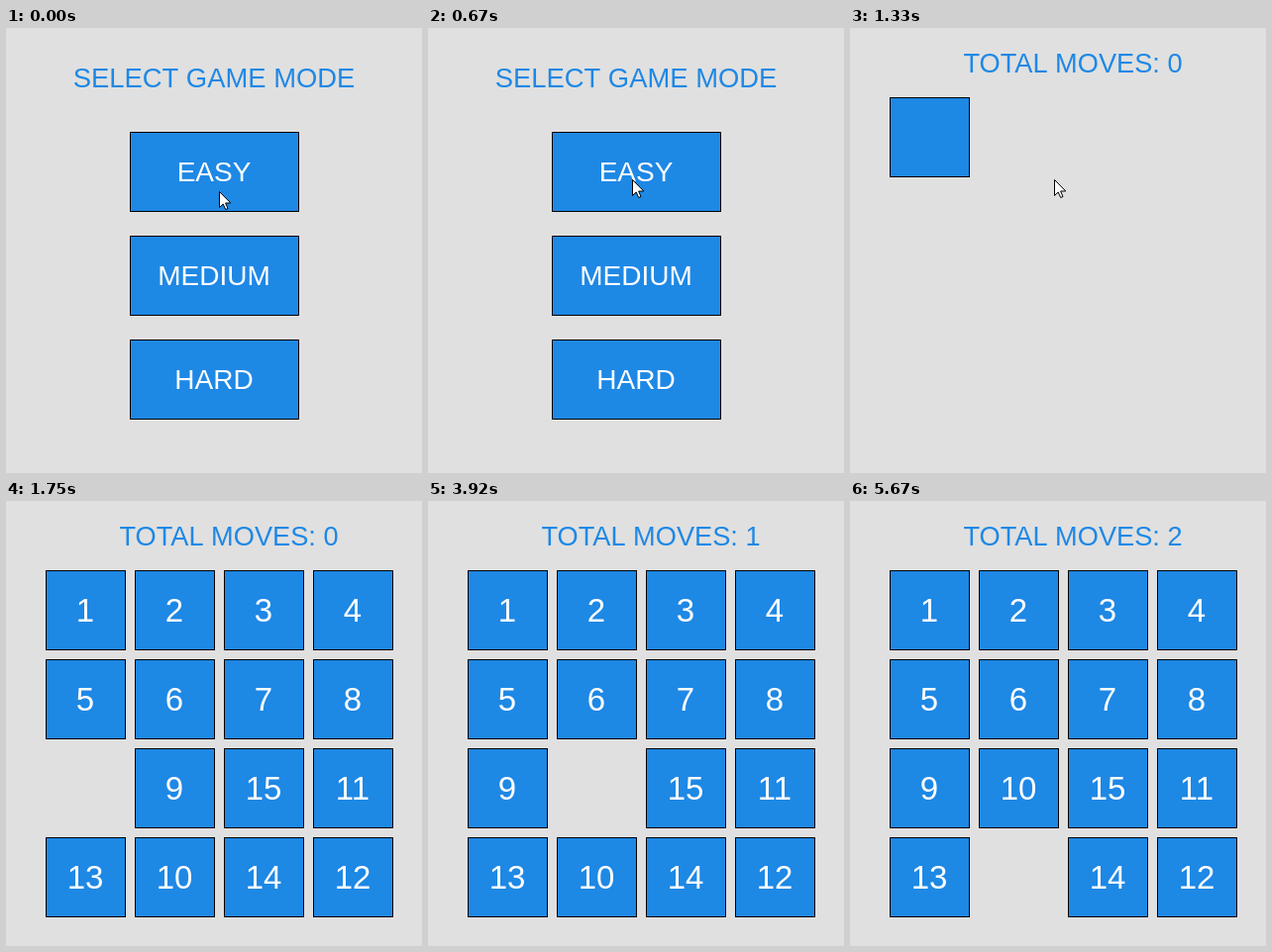
Recreate the animation shown at these times as an HTML page with a canvas. Size 420 px wide and 450 px high, loop 8000 ms.

```html
<!DOCTYPE html>
<html lang="en">
<head>
<meta charset="utf-8">
<title>Sliding puzzle</title>
<style>
html, body { margin: 0; width: 420px; height: 450px; overflow: hidden; background: #e0e0e0; }
canvas { display: block; }
</style>
</head>
<body>
<canvas id="stage" width="420" height="450"></canvas>
<script>
const ctx = document.getElementById('stage').getContext('2d');
const LOOP = 8000, BLUE = '#1e88e5';
const START = [1, 2, 3, 4, 5, 6, 7, 8, 0, 9, 15, 11, 13, 10, 14, 12];
const arrow = new Path2D('M.5 .5V16.5L4.2 13L6.7 18.5L9 17.5L6.6 12H11.8Z');

function label(text, x, y, size, color) {
  ctx.font = `${size}px "Liberation Sans", Arial, sans-serif`;
  ctx.textAlign = 'center';
  ctx.fillStyle = color;
  ctx.fillText(text, x, y);
}

function box(x, y, w, text, size) {
  ctx.fillStyle = BLUE;
  ctx.fillRect(x, y, w + 1, 81);
  ctx.strokeStyle = '#000';
  ctx.lineWidth = 1;
  ctx.strokeRect(x + .5, y + .5, w, 80);
  label(text, x + w / 2, y + 40 + size * .36, size, '#fff');
}

function pointer(x, y) {
  ctx.save();
  ctx.translate(x, y);
  ctx.fillStyle = '#fff';
  ctx.fill(arrow);
  ctx.strokeStyle = '#000';
  ctx.stroke(arrow);
  ctx.restore();
}

function menu() {
  label('SELECT GAME MODE', 210, 60, 27.4, BLUE);
  ['EASY', 'MEDIUM', 'HARD'].forEach((name, i) => box(125, 105 + 105 * i, 170, name, 28));
}

function board(t) {
  const tiles = START.slice();
  if (t >= 3920) [tiles[8], tiles[9]] = [9, 0];
  if (t >= 5580) tiles[13] = 0;
  if (t >= 5670) tiles[9] = 10;
  const moves = t < 3920 ? 0 : t < 5580 ? 1 : 2;
  label('TOTAL MOVES: ' + moves, 225, 45, 27.2, BLUE);
  if (t < 1420) return box(40, 70, 80, '', 33);
  tiles.forEach((n, i) => {
    if (n) box(40 + 90 * (i % 4), 70 + 90 * (i >> 2), 80, n, 33);
  });
}

function draw(t) {
  ctx.fillStyle = '#e0e0e0';
  ctx.fillRect(0, 0, 420, 450);
  if (t < 1330) menu(); else board(t);
  if (t < 1670) {
    const step = [420, 500, 590, 670].filter(at => t >= at).length;
    pointer(Math.round(215 - 9 * step / 4), 165 - 3 * step);
  } else if (t < 1750) pointer(108, 110);
}

function tick() {
  draw(performance.now() % LOOP);
  requestAnimationFrame(tick);
}
tick();
</script>
</body>
</html>
```
